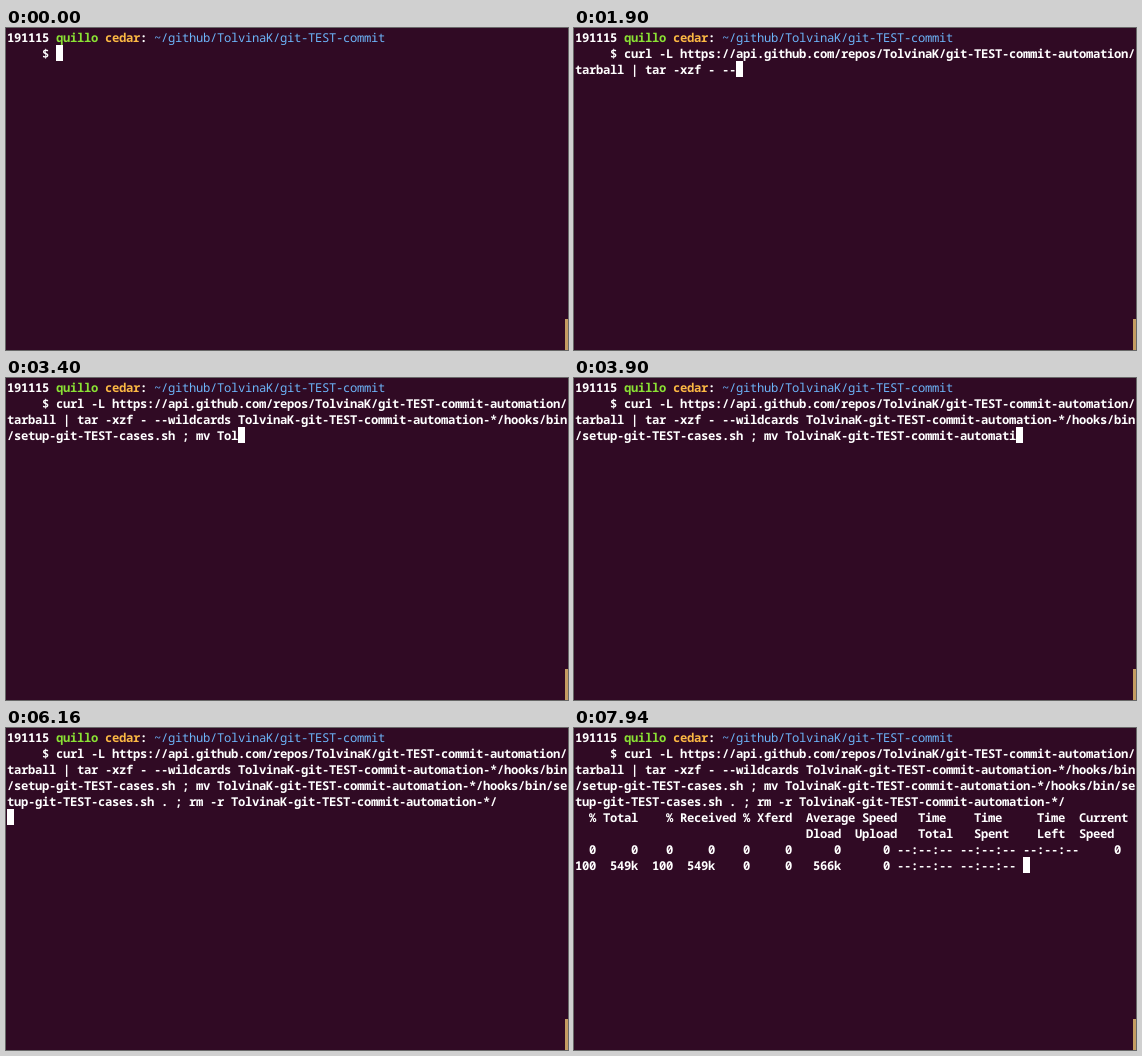
Animation, 562 px wide and 322 px high, one loop 8 s. Source, as an HTML page:

```html
<!DOCTYPE html>
<html lang="en">
<head>
<meta charset="utf-8">
<title>Terminal session</title>
<style>
  html, body { margin: 0; width: 100%; height: 100%; overflow: hidden; background: #300a24; }
  #stage { position: relative; width: 562px; height: 322px; overflow: hidden; background: #300a24; }
  pre, #cursor {
    position: absolute; margin: 0; color: #fff;
    font: bold 12.2px/16px "Noto Sans Mono", "DejaVu Sans Mono", monospace;
    letter-spacing: calc(7px - 1ch);
    font-variant-ligatures: none; text-rendering: geometricPrecision;
  }
  pre { left: 1px; top: 2px; }
  .user { color: #8ae234; }
  .host { color: #fcb944; }
  .path { color: #6cb4f8; font-weight: normal; }
  #cursor { width: 7px; height: 16px; line-height: 18px; background: #fff; color: #300a24; white-space: pre; }
  #scrollbar { position: absolute; left: 559px; top: 291px; width: 3px; height: 31px; background: #c49c62; }
</style>
</head>
<body>
<div id="stage">
  <pre>191115 <span class="user">quillo</span> <span class="host">cedar</span>: <span class="path">~/github/TolvinaK/git-TEST-commit</span>
<span id="screen"></span></pre>
  <div id="cursor"></div>
  <div id="scrollbar"></div>
</div>
<script>
const LOOP = 8000, COLS = 80, CELL_W = 7, CELL_H = 16;
const PROMPT = '     $ ';
const REPO = 'TolvinaK-git-TEST-commit-automation-*/';
const SCRIPT = 'bin/setup-git-TEST-cases.sh';
const COMMAND = 'curl -L https://api.github.com/repos/TolvinaK/git-TEST-commit-automation/tarball'
  + ` | tar -xzf - --wildcards ${REPO}hooks/${SCRIPT}`
  + ` ; mv ${REPO}hooks/${SCRIPT} . ; rm -r ${REPO}`;
const OUTPUT = [
  '  % Total    % Received % Xferd  Average Speed   Time    Time     Time  Current',
  '                                 Dload  Upload   Total   Spent    Left  Speed',
  '  0     0    0     0    0     0      0      0 --:--:-- --:--:-- --:--:--     0',
  '100  549k  100  549k    0     0   566k      0 --:--:-- --:--:-- '
].join('\n');

const ENTER = 6160;
// [time, output characters shown]
const OUTPUT_STEPS = [
  [6160, 0], [6200, 44], [6300, 88], [6400, 132], [6500, 176],
  [6600, 220], [6800, 236], [7740, 258], [7840, 280], [7940, 301]
];
// [time, row, column]; no row means hidden
const CURSOR_STEPS = [
  [6160, 5, 0], [6200], [7190, 7, 57], [7740], [7940, 8, 64]
];

const screen = document.getElementById('screen');
const cursor = document.getElementById('cursor');
const stepAt = (steps, t) => steps.filter(step => step[0] <= t).pop();

function typedCount(t) {
  if (t < 500) return 0;
  if (t >= ENTER) return COMMAND.length;
  const ticks = Math.min(49, Math.floor((t - 500) / 100) + 1);
  return 6 * ticks + (ticks <= 12 ? 1 : 6);
}

function cursorAt(t, typed) {
  if (t >= ENTER) {
    const [, row, col] = stepAt(CURSOR_STEPS, t);
    return row === undefined ? null : [row, col];
  }
  const blinkedOff = t >= 1150 && t < 4850 && (t - 1150) % 1600 < 500;
  const cell = PROMPT.length + typed;
  return blinkedOff ? null : [1 + Math.floor(cell / COLS), cell % COLS];
}

function render(t) {
  const typed = typedCount(t);
  const lines = (PROMPT + COMMAND.slice(0, typed)).match(/.{1,80}/g);
  if (t >= ENTER) {
    lines.push(...OUTPUT.slice(0, stepAt(OUTPUT_STEPS, t)[1]).split('\n'));
  }
  const text = lines.join('\n');
  if (screen.textContent !== text) screen.textContent = text;

  const place = cursorAt(t, typed);
  cursor.style.display = place ? 'block' : 'none';
  if (place) {
    const [row, col] = place;
    cursor.style.left = 1 + col * CELL_W + 'px';
    cursor.style.top = 1 + row * CELL_H + 'px';
    cursor.textContent = (lines[row - 1] || '')[col] || '';
  }
}

const start = performance.now();
function tick() {
  render((performance.now() - start) % LOOP);
  requestAnimationFrame(tick);
}
render(0);
requestAnimationFrame(tick);
</script>
</body>
</html>
```
